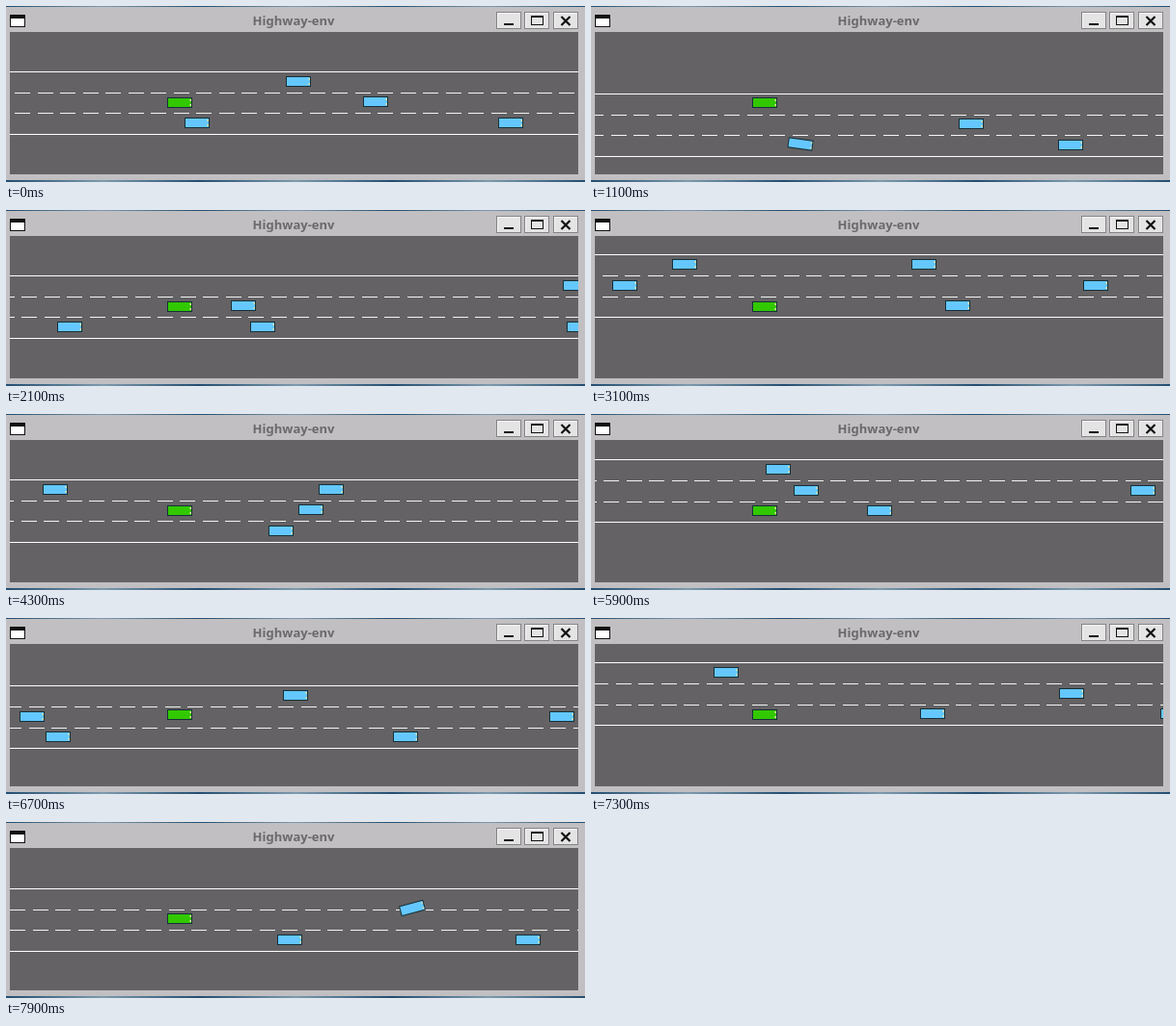
An HTML page with a canvas that plays this animation: 600 by 183 pixels, repeating every 8 s.

```html
<!DOCTYPE html>
<html lang="en">
<head>
<meta charset="utf-8">
<title>Highway-env</title>
<style>
  html, body { margin: 0; width: 600px; height: 183px; overflow: hidden; }
  canvas { display: block; }
</style>
</head>
<body>
<canvas id="stage" width="600" height="183"></canvas>
<script>
const ctx = document.getElementById('stage').getContext('2d');
const LANE = 21.7, EGO_X = 180, EGO_Y = 100.5;
const DASH = 16, DASH_GAP = 23.5, SCROLL = 75;

// First lane, then pairs of start time and new lane
const egoLanes = [1, .6, -.06, 1.3, 1.85, 1.6, 1, 2.1, 0, 2.7, 2, 3.6, 1,
  4.38, 0, 5.5, 1.96, 6.15, .9, 6.7, 0, 7, 2, 7.3, .96];

// Lanes as above, then pairs of time and x
const traffic = [
  [[0], [0, 303, 1.1, -20]],
  [[2], [0, 198, 1, -20]],
  [[1, .675, 2], [0, 383, 1.1, 217]],
  [[2, .4, 1, 2.55, 0], [0, 523, 1.1, 394, 3.1, 97]],
  [[2, 2.55, 1], [1.1, 497, 3.1, 35]],
  [[0], [3.1, 345, 4.3, 51]],
  [[1], [3.1, 523, 4.3, 315.5, 5.9, 223, 6.7, 27]],
  [[2], [2, 615, 3.1, 379.5, 4.3, 284.5, 5.8, -20]],
  [[0], [3.1, 615, 4.3, 337, 5.9, 194, 6.7, -20]],
  [[2], [5.9, 299, 6.7, 53.5]],
  [[1, 6.05, 0], [5.9, 571.5, 6.7, 300, 7.9, -20]],
  [[2], [5.9, 613, 6.7, 413.5, 7.9, 294]],
  [[1, 7.65, 0], [6.7, 575.5, 7.9, 421]],
  [[2], [7.2, 613, 7.9, 541]]
];

// Eased lane changes, with a tilt from the sideways speed
function steer(lanes, t, duration) {
  let lane = lanes[0], angle = 0;
  for (let i = 1; i < lanes.length && lanes[i] <= t; i += 2) {
    const u = Math.min(1, (t - lanes[i]) / duration);
    const shift = lanes[i + 1] - lane;
    lane += shift * u * u * (3 - 2 * u);
    angle = 30 * shift * u * (1 - u) / duration;
  }
  return { lane, angle: Math.max(-15, Math.min(15, angle)) * Math.PI / 180 };
}

// Straight lines between the points, continued past both ends
function xAt(points, t) {
  let i = 0;
  while (i + 4 < points.length && t > points[i + 2]) i += 2;
  const [t0, x0, t1, x1] = points.slice(i, i + 4);
  return x0 + (x1 - x0) * (t - t0) / (t1 - t0);
}

function box(color, x, y, w, h) {
  ctx.fillStyle = color;
  ctx.fillRect(x, y, w, h);
}

function car(color, x, y, angle) {
  ctx.save();
  ctx.translate(Math.round(x), Math.floor(y) + .5);
  ctx.rotate(angle);
  box('#173039', -13, -5.5, 26, 11);
  box(color, -12, -4.5, 24, 9);
  box('#d9dca8', 10.5, -3.5, 1.5, 2);
  box('#d9dca8', 10.5, 1.5, 1.5, 2);
  ctx.restore();
}

function button(x) {
  box('#858385', x, 6, 26, 18);
  box('#f6f5f6', x + 1, 7, 24, 16);
  box('#e5e4e5', x + 2, 8, 23, 15);
}

function drawWindow() {
  box('#c1bfc1', 0, 0, 600, 183);
  const edge = ctx.createLinearGradient(0, 0, 600, 0);
  for (let i = 0; i <= 6; i++) edge.addColorStop(i / 6, i % 2 ? '#7d9aad' : '#244d70');
  box(edge, 0, 0, 600, 1);
  box(edge, 0, 181, 600, 2);

  box('#111', 4, 9, 16, 13);
  box('#fff', 5, 13, 14, 8);

  ctx.fillStyle = '#6b696b';
  ctx.font = 'bold 13px "Noto Sans", "Open Sans", sans-serif';
  ctx.textAlign = 'center';
  ctx.fillText('Highway-env', 298, 20);

  [508, 537, 567].forEach(button);
  box('#111', 516, 18, 10, 2);
  box('#111', 544, 10, 13, 10);
  box('#e5e4e5', 545, 12, 11, 7);
  ctx.strokeStyle = '#111';
  ctx.lineWidth = 2.2;
  ctx.beginPath();
  for (const side of [-4.5, 4.5]) {
    ctx.moveTo(580 + side, 11);
    ctx.lineTo(580 - side, 20);
  }
  ctx.stroke();
}

function drawRoad(t) {
  const ego = steer(egoLanes, t, .3);
  const top = EGO_Y - LANE * (ego.lane + .5);
  ctx.save();
  ctx.beginPath();
  ctx.rect(4, 27, 589, 148);
  ctx.clip();
  box('#646264', 4, 27, 589, 148);

  const start = (9 - SCROLL * t) % DASH_GAP;
  for (let i = 0; i < 4; i++) {
    const y = Math.round(top + LANE * i);
    if (i % 3 === 0) box('#fff', 4, y, 589, 1);
    else for (let x = start - DASH_GAP; x < 593; x += DASH_GAP) {
      box('#f4f4f4', Math.round(x), y, DASH, 1);
    }
  }

  for (const [lanes, points] of traffic) {
    const { lane, angle } = steer(lanes, t, .5);
    car('#64c8ff', xAt(points, t), top + LANE * (lane + .5) - .6, angle);
  }
  car('#32c800', EGO_X, EGO_Y, ego.angle);
  ctx.restore();
}

function draw() {
  drawWindow();
  drawRoad(Math.floor(performance.now() / 100) % 80 / 10);
  requestAnimationFrame(draw);
}
draw();
</script>
</body>
</html>
```
